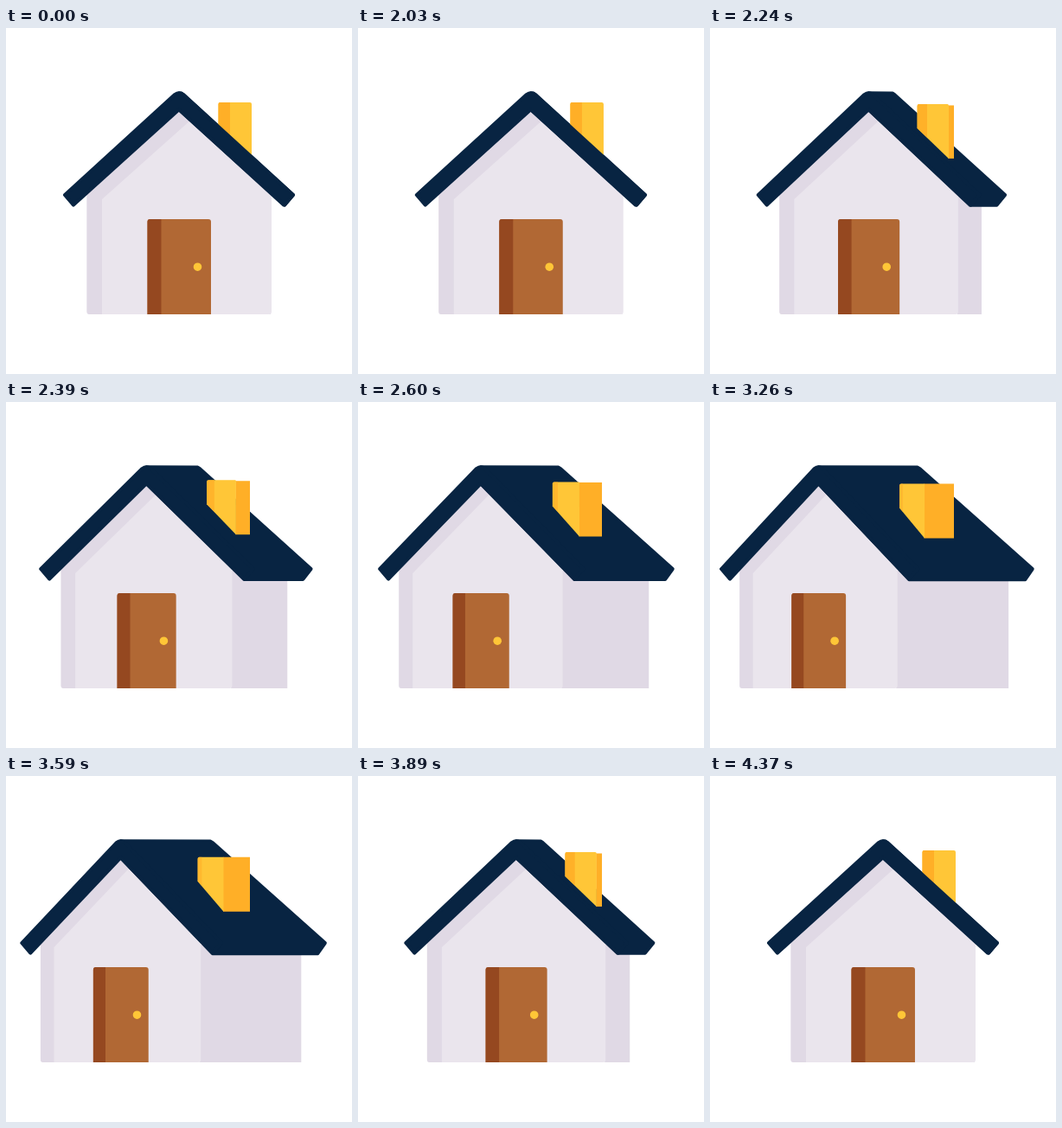
An HTML page without scripts that plays this animation: 400 px wide and 400 px high, repeating every 4.4 s.

```html
<!DOCTYPE html>
<html lang="en">
<head>
<meta charset="utf-8">
<title>Turning house</title>
<style>
  html, body { margin: 0; height: 100%; overflow: hidden; background: #fff; }
  svg { display: block; width: 100vw; height: 100vh; }

  /* Every part morphs from its front view to its three-quarter view and back. */
  path { d: var(--front); animation: turn 4.4s infinite; }
  @keyframes turn {
    0% { d: var(--front); opacity: 1; }
    45.4545% { d: var(--front); opacity: 1; animation-timing-function: cubic-bezier(.28, 0, .25, 1); }
    72.7273% { d: var(--turned); opacity: var(--fade, 1); animation-timing-function: cubic-bezier(.8, 0, .2, 1); }
    100% { d: var(--front); opacity: 1; }
  }

  .roof { fill: #082442; stroke: #082442; stroke-width: 4; stroke-linejoin: round; }
  .wall { fill: #eae5ed; }
  .shade { fill: #e0d9e5; }
  .door { fill: #b16834; }
  .jamb { fill: #954820; }
  .yellow { fill: #ffc637; }
  .orange { fill: #ffaf27; }

  #side {
    --front: path("M306 195H305V331H306Z");
    --turned: path("M215 195H345.2V331H215Z");
  }
  #gable {
    --front: path("M93.5 182L200 85L307 182V328Q307 331 304 331H96.5Q93.5 331 93.5 328Z");
    --turned: path("M34.2 182L125.4 85L216.5 182V328Q216.5 331 213.5 331H37.2Q34.2 331 34.2 328Z");
  }
  #gable-shade {
    --front: path("M93.5 182L200 85L216 104.3L111 198V331H96.5Q93.5 331 93.5 328Z");
    --turned: path("M34.2 182L125.4 85L138 103L49.6 198V331H37.2Q34.2 331 34.2 328Z");
  }
  #door {
    --front: path("M163.5 331V224Q163.5 221 166.5 221H234Q237 221 237 224V331Z");
    --turned: path("M94.2 331V224Q94.2 221 97.2 221H154Q157 221 157 224V331Z");
  }
  #jamb {
    --front: path("M163.5 331V224Q163.5 221 166.5 221H179.5V331Z");
    --turned: path("M94.2 331V224Q94.2 221 97.2 221H108.1V331Z");
  }
  #knob {
    --front: path("M216.7 276.2a4.8 4.8 0 1 1 9.6 0a4.8 4.8 0 1 1 -9.6 0Z");
    --turned: path("M139.2 276.2a4.8 4.8 0 1 1 9.6 0a4.8 4.8 0 1 1 -9.6 0Z");
  }
  #slope {
    --front: path("M200 75.2L203 75.5L205 77L332 193L322 204.6H321L200 94.3Z");
    --turned: path("M125.4 75.2L240 75.6L243 77.5L372.8 193L364.5 205.2H230L125.4 94.3Z");
  }
  #stack-side {
    --front: path("M283.5 88H282V149H283.5Z");
    --turned: path("M247.5 94.5H282V157.5H247.5Z");
  }
  #stack {
    --front: path("M245.5 114V88Q245.5 86 247.5 86H282Q284 86 284 88V149Z");
    --turned: path("M219 122.5V96.5Q219 94.5 221 94.5H248Q248 94.5 248 94.5V157.5Z");
  }
  #stack-shade {
    --fade: .5;
    --front: path("M245.5 114V88Q245.5 86 247.5 86H259V126.3Z");
    --turned: path("M219 122.5V96.5Q219 94.5 221 94.5H223V127.3Z");
  }
  #eaves {
    --front: path("M68 193L195 77Q200 73.4 205 77L332 193L322 204.6L200 94.3L78 204.6Z");
    --turned: path("M13 193L120.5 77Q125.4 73.4 130 77L240 193L230 204.6L125.4 94.3L23 204.6Z");
  }
</style>
</head>
<body>
<svg viewBox="0 0 400 400">
  <path id="side" class="shade"/>
  <path id="gable" class="wall"/>
  <path id="gable-shade" class="shade"/>
  <path id="door" class="door"/>
  <path id="jamb" class="jamb"/>
  <path id="knob" class="yellow"/>
  <path id="slope" class="roof"/>
  <path id="stack-side" class="orange"/>
  <path id="stack" class="yellow"/>
  <path id="stack-shade" class="orange"/>
  <path id="eaves" class="roof"/>
</svg>
</body>
</html>
```
